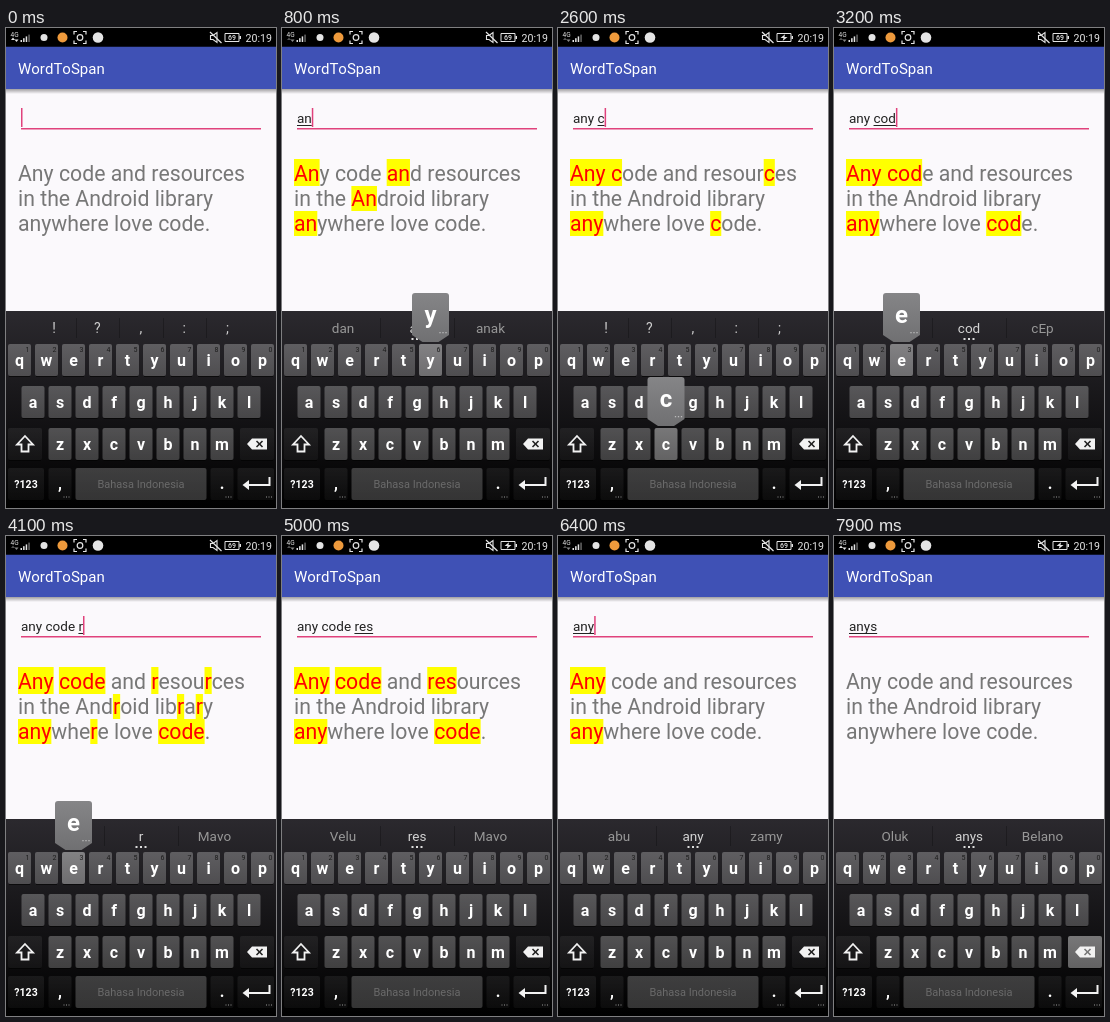
These frames come from a looping animation (270x480 px, 8000 ms). An HTML page with a canvas:

```html
<!DOCTYPE html>
<html lang="en">
<head>
<meta charset="utf-8">
<title>WordToSpan</title>
<style>
html, body { margin: 0; width: 100%; height: 100%; overflow: hidden; background: #000; }
canvas { display: block; width: 270px; height: 480px; }
</style>
</head>
<body>
<canvas id="stage"></canvas>
<script>
const LOOP = 8000, W = 270, H = 480;
const canvas = document.getElementById('stage');
const dpr = window.devicePixelRatio || 1;
canvas.width = W * dpr;
canvas.height = H * dpr;
const c = canvas.getContext('2d');
c.scale(dpr, dpr);
c.fontKerning = 'none';

const PINK = '#e0427c';
const LINES = ['Any code and resources', 'in the Android library', 'anywhere love code.'];

// time, typed text, pressed key, word the suggestions belong to
const STEPS = [
  [0, '', '', ''], [200, '', 'a', ''], [300, 'a', 'a', ''], [400, 'a', '', 'a'],
  [500, 'a', 'n', 'a'], [600, 'an', 'n', 'a'], [700, 'an', '', 'an'],
  [800, 'an', 'y', 'an'], [900, 'any', 'y', 'an'], [1000, 'any', '', 'an'],
  [1100, 'any', '', 'any'], [1400, 'any', 'space', 'any'], [1500, 'any ', '', 'any'],
  [1600, 'any ', '', ''], [2500, 'any ', 'c', ''], [2600, 'any c', 'c', ''],
  [2700, 'any c', 'o', 'c'], [2800, 'any co', 'o', 'c'], [2900, 'any co', '', 'co'],
  [3000, 'any co', 'd', 'co'], [3100, 'any cod', 'd', 'co'], [3200, 'any cod', 'e', 'cod'],
  [3400, 'any code', '', 'cod'], [3500, 'any code', '', 'code'], [3600, 'any code ', '', ''],
  [3900, 'any code ', 'r', ''], [4000, 'any code r', 'r', ''], [4100, 'any code r', 'e', 'r'],
  [4200, 'any code re', '', 're'], [4400, 'any code re', 's', 're'],
  [4500, 'any code res', 's', 're'], [4600, 'any code res', '', 'res'],
  [5100, 'any code res', 'del', 'res'], [5300, 'any code re', '', 're'],
  [5400, 'any code re', 'del', 're'], [5500, 'any code r', 'del', 'r'],
  [5600, 'any code ', 'del', ''], [5800, 'any code', 'del', 'code'],
  [5900, 'any cod', 'del', 'cod'], [6000, 'any c', 'del', 'c'], [6100, 'any ', 'del', ''],
  [6300, 'any', 'del', ''], [6400, 'any', '', 'any'], [6900, 'any', 's', 'any'],
  [7000, 'anys', 's', 'any'], [7100, 'anys', '', 'anys'], [7900, 'anys', 'del', 'anys']
];
const SIDES = {
  a: ['di', 'ada'], an: ['dan', 'anak'], any: ['abu', 'zamy'], anys: ['Oluk', 'Belano'],
  c: ['di', 'cara'], co: ['do', 'coba'], cod: ['c', 'cEp'], code: ['kode', 'coba'],
  r: ['e', 'Mavo'], re: ['de', 'Mavo'], res: ['Velu', 'Mavo']
};
const BLINKS = [[2000, 2500], [5000, 5100], [7500, 8000]];
const within = (t, spans) => spans.some(([a, b]) => t >= a && t < b);

function font(size, weight = 400) {
  c.font = `${weight} ${size}px Roboto, sans-serif`;
}
function text(s, x, y, color, align = 'left') {
  c.fillStyle = color;
  c.textAlign = align;
  c.fillText(s, x, y);
}
function rect(x, y, w, h, color) {
  c.fillStyle = color;
  c.fillRect(x, y, w, h);
}
function path(points, closed) {
  c.beginPath();
  points.forEach(([x, y]) => c.lineTo(x, y));
  if (closed) c.closePath();
}
function stroke(points, color, width, closed) {
  path(points, closed);
  c.strokeStyle = color;
  c.lineWidth = width;
  c.stroke();
}
function fill(points, color) {
  path(points, true);
  c.fillStyle = color;
  c.fill();
}
function disc(x, y, r, color) {
  c.beginPath();
  c.arc(x, y, r, 0, 7);
  c.fillStyle = color;
  c.fill();
}
function shade(y0, y1, from, to) {
  const g = c.createLinearGradient(0, y0, 0, y1);
  g.addColorStop(0, from);
  g.addColorStop(1, to);
  return g;
}
function dots(x, y, gap, size, color) {
  for (let i = -1; i < 2; i++) rect(x + i * gap - size / 2, y, size, size, color);
}

function statusBar(t) {
  const ink = '#e4e4e4';
  rect(0, 0, W, 18.75, '#000');
  font(6.5);
  text('4G', 4.5, 9, ink);
  const busy = within(t, [[0, 500], [1600, 2500], [7500, 8000]]);
  fill([[5, 12], [7, 9.5], [9, 12]], busy ? ink : '#555');
  fill([[8.5, 11.5], [12.5, 11.5], [10.5, 14]], busy ? ink : '#888');
  for (let i = 0; i < 4; i++) rect(14.5 + i * 2.6, 12 - i * 1.8, 1.5, 2 + i * 1.8, i < 3 ? ink : '#666');
  disc(38, 9.5, 3.5, ink);
  disc(56.5, 9.5, 5, '#ee9a3c');
  for (const sx of [-1, 1]) for (const sy of [-1, 1]) {
    stroke([[74 + sx * 6, 9.5 + sy * 3], [74 + sx * 6, 9.5 + sy * 6], [74 + sx * 3, 9.5 + sy * 6]], ink, 1.2);
  }
  c.beginPath();
  c.arc(74, 9.5, 2.8, 0, 7);
  c.stroke();
  disc(92, 9.5, 5.3, ink);

  stroke([[204.5, 7.5], [207, 7.5], [211, 4.5], [211, 14.5], [207, 11.5], [204.5, 11.5]], ink, 1.1, true);
  stroke([[204, 4], [215.5, 15]], ink, 1.2);
  stroke([[219, 5.5], [233, 5.5], [233, 13.5], [219, 13.5]], ink, 1, true);
  rect(233.5, 8, 1.5, 3, ink);
  if (within(t, [[1500, 3000], [4500, 6000], [7500, 8000]])) {
    fill([[227, 6.2], [222.5, 10], [225.5, 10], [224.7, 13], [229.5, 9], [226.5, 9]], ink);
  } else {
    font(7, 500);
    text('69', 226, 12, ink, 'center');
  }
  font(10.6);
  text('20:19', 266, 13.5, ink, 'right');
}

function appBar() {
  rect(0, 61, W, 5, shade(61, 66, 'rgba(0,0,0,.36)', 'rgba(0,0,0,0)'));
  rect(0, 18, W, 43, '#3f51b5');
  font(15);
  text('WordToSpan', 12, 45.5, '#fff');
}

function field(value, cursor) {
  font(13.5);
  const x = 15, end = x + c.measureText(value).width;
  text(value, x, 95, '#222');
  const start = x + c.measureText(value.slice(0, value.lastIndexOf(' ') + 1)).width;
  if (end > start) rect(start, 97, end - start, 1, '#222');
  rect(15, 100, 240, 1.5, PINK);
  if (cursor) rect(end, 80, 1.5, 19, PINK);
}

function passage(value) {
  const query = value.trim();
  const finder = query ? new RegExp([query, ...query.split(' ')].join('|'), 'gi') : null;
  font(21.25);
  LINES.forEach((line, row) => {
    const base = 153 + row * 25;
    const left = i => 12 + c.measureText(line.slice(0, i)).width;
    text(line, 12, base, '#777');
    if (!finder) return;
    for (const m of line.matchAll(finder)) {
      const x = left(m.index), w = left(m.index + m[0].length) - x;
      const top = row ? base - 20 : 131;
      rect(x, top, w, base + 5 - top, '#ff0');
      text(m[0], x, base, '#f00');
    }
  });
}

// key faces are white veils over the keyboard's gradient
const VEILS = { letter: [.27, .22], dark: [.07, .04], space: [.22, .2], down: [.43, .36] };

function keyCap(x, y, w, kind) {
  const [top, bottom] = VEILS[kind].map(a => `rgba(255,255,255,${a})`);
  rect(x + 1, y + 32, w - 2, 1, 'rgba(0,0,0,.6)');
  c.beginPath();
  c.roundRect(x, y, w, 32, 2);
  c.fillStyle = shade(y, y + 32, top, bottom);
  c.fill();
}

function suggestions(word) {
  const divider = x => rect(x, 290, 1, 20, 'rgba(0,0,0,.25)');
  if (!word) {
    font(14);
    [...'!?,:;'].forEach((s, i) => text(s, 48 + i * 43.4, 304.5, '#d0d0d0', 'center'));
    [70, 113, 157, 200].forEach(divider);
    return;
  }
  font(13.5);
  const [a, b] = SIDES[word];
  text(a, 61, 304.5, '#989898', 'center');
  text(b, 208.5, 304.5, '#989898', 'center');
  text(word, 135, 304.5, '#d4d4d4', 'center');
  dots(135, 310, 4.5, 2, '#ddd');
  [98, 172].forEach(divider);
}

function popup(key, x, y) {
  c.beginPath();
  c.moveTo(x - 18.5, y - 48);
  c.arcTo(x - 18.5, y - 51, x - 15, y - 51, 3);
  c.lineTo(x + 15, y - 51);
  c.arcTo(x + 18.5, y - 51, x + 18.5, y - 48, 3);
  c.lineTo(x + 18.5, y - 9);
  c.lineTo(x + 8, y - 2);
  c.lineTo(x - 8, y - 2);
  c.lineTo(x - 18.5, y - 9);
  c.closePath();
  c.fillStyle = shade(y - 51, y - 2, '#858587', '#707072');
  c.fill();
  font(24, 700);
  text(key, x, y - 20.7, '#fff', 'center');
  dots(x + 12.5, y - 12, 3, 1.3, '#bbb');
}

function keyboard(pressed, word) {
  rect(0, 283, W, 197, shade(283, 480, '#2b292e', '#000'));
  suggestions(word);

  let held = null;
  [['qwertyuiop', 13.5, 316], ['asdfghjkl', 27, 358], ['zxcvbnm', 54, 400]].forEach(([letters, x0, y], row) => {
    [...letters].forEach((k, i) => {
      const x = x0 + i * 27;
      keyCap(x - 11.5, y, 23, k === pressed ? 'down' : 'letter');
      font(16, 700);
      text(k, x, y + 21.8, '#fff', 'center');
      if (!row) {
        font(7);
        text((i + 1) % 10, x + 10, y + 8, '#1c1c1c', 'right');
      }
      if (k === pressed) held = [k, x, y];
    });
  });

  keyCap(2, 400, 34, 'dark');
  stroke([[19, 408], [27, 416.5], [22.5, 416.5], [22.5, 423.5], [15.5, 423.5], [15.5, 416.5], [11, 416.5]], '#f2f2f2', 1.8, true);

  const del = pressed === 'del';
  keyCap(234, 400, 34, del ? 'down' : 'dark');
  fill([[241, 416], [246, 410.5], [261, 410.5], [261, 421.5], [246, 421.5]], '#f2f2f2');
  const cross = del ? '#777' : '#222';
  stroke([[250.5, 413], [256.5, 419]], cross, 1.6);
  stroke([[256.5, 413], [250.5, 419]], cross, 1.6);

  keyCap(2, 440, 36, 'dark');
  font(10.5, 700);
  text('?123', 20, 459.5, '#fff', 'center');
  keyCap(42.5, 440, 23, 'dark');
  keyCap(69.5, 440, 131, pressed === 'space' ? 'down' : 'space');
  keyCap(204.5, 440, 23, 'dark');
  keyCap(231.5, 440, 36.5, 'dark');
  font(16, 700);
  text(',', 54, 461, '#fff', 'center');
  text('.', 216, 461, '#fff', 'center');
  font(11);
  text('Bahasa Indonesia', 135, 460, '#6a6a6a', 'center');
  stroke([[263.5, 449], [263.5, 457], [241, 457]], '#f2f2f2', 2);
  fill([[236.5, 457], [243, 452], [243, 462]], '#f2f2f2');
  [60.5, 222.5, 263].forEach(x => dots(x, 468.5, 2.5, 1, '#999'));

  if (held) popup(...held);
}

function draw(t) {
  const [, value, pressed, word] = STEPS.findLast(s => s[0] <= t);
  rect(0, 0, W, H, '#fbf9fc');
  field(value, !within(t, BLINKS));
  passage(value);
  appBar();
  statusBar(t);
  keyboard(pressed, word);
}

const began = performance.now();
function tick() {
  draw((performance.now() - began) % LOOP);
  requestAnimationFrame(tick);
}
tick();
</script>
</body>
</html>
```
